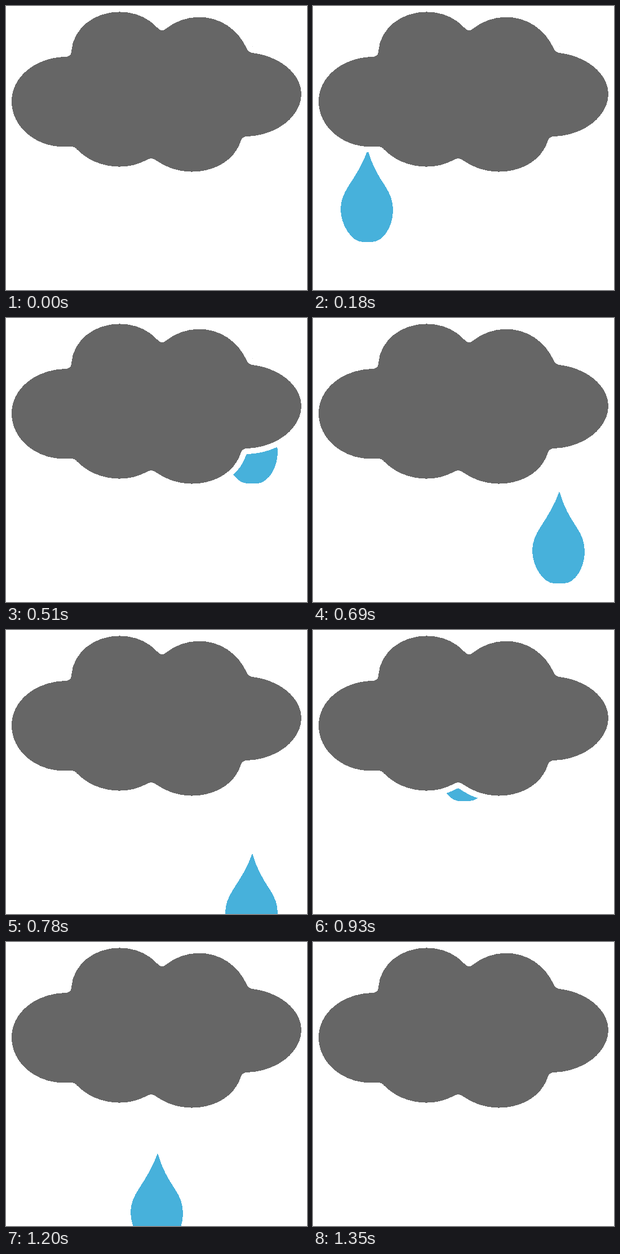
An HTML page that plays this animation: 534x503 px, repeating every 1.38 s.

```html
<!DOCTYPE html>
<html lang="en">
<head>
<meta charset="utf-8">
<title>Rain cloud</title>
<style>
  html, body { margin: 0; width: 100%; height: 100%; overflow: hidden; background: #fff; }
  svg { display: block; width: 534px; height: 503px; }
</style>
</head>
<body>
<svg viewBox="0 0 534 503" shape-rendering="crispEdges">
  <path id="drop" fill="#47b1db" d="M0 0C-8 24 -21 44 -34 64C-43 78 -48 91 -48 105
    C-48 132 -29 163 -9 163H8C28 163 45 135 45 107C45 90 40 78 31 64C19 46 8 28 0 0Z"/>
  <path fill="#666" stroke="#fff" stroke-width="20" stroke-linejoin="round" paint-order="stroke"
    d="M116 80C119 40 156 10.4 201 10.4C228 10.4 251 20 268 38Q276 47 284 40
    C301 27 320 19.6 343 19.6C380 19.6 412 42 427 75Q430 82 437 83
    C486 89 524 120 524 156C524 195 481 229 428 231Q420 231 417 238
    C406 273 371 293.6 329 293.6C304 293.6 283 285 267 274Q258 267 249 273
    C234 281 218 284.6 201 284.6C171 284.6 143 272 126 254Q121 248 114 249.4H103
    C51 249.4 10 213 10 169C10 126 51 92 104 90C112 90 116 87 116 80Z"/>
  <path fill="#ddd" d="M437 71h1v1h-1z"/>
</svg>
<script>
  const LOOP = 1380, STEP = 30;
  // Each fall: first step, x and y of the tip, pixels per step
  const falls = [
    { first: 0, x: 97, y: 88, speed: 27.8 },
    { first: 15, x: 437, y: 71, speed: 29.5 },
    { first: 30, x: 269, y: 114, speed: 26 }
  ];
  const drop = document.getElementById('drop');

  function draw() {
    const step = Math.floor(performance.now() % LOOP / STEP);
    const { first, x, y, speed } = falls[Math.min(2, Math.floor(step / 15))];
    drop.setAttribute('transform', `translate(${x} ${y + (step - first) * speed})`);
    requestAnimationFrame(draw);
  }
  draw();
</script>
</body>
</html>
```
